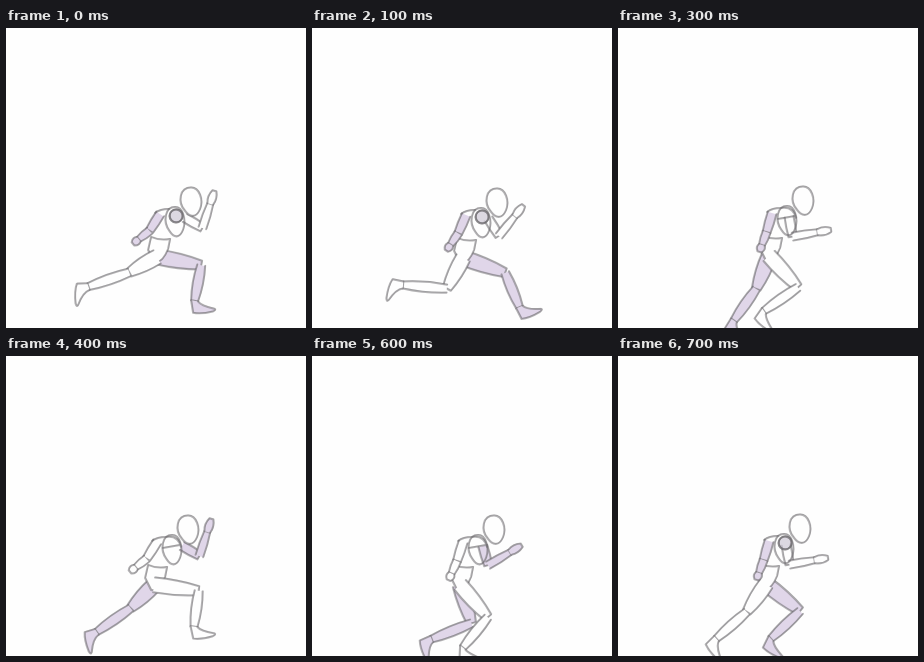
Recreate the animation shown at these times as an HTML page with a canvas. Size 300x300 px, loop 800 ms.

```html
<!DOCTYPE html>
<html lang="en">
<head>
<meta charset="utf-8">
<title>Run cycle</title>
<style>
html, body { margin: 0; height: 100%; overflow: hidden; background: #fefefe; }
canvas { display: block; width: 100vw; height: 100vh; }
</style>
</head>
<body>
<canvas id="stage" width="300" height="300"></canvas>
<script>
const ctx = document.getElementById('stage').getContext('2d');
const PAPER = '#fefefe', LILAC = '#e0d6e9';
const STEP = 100, BEATS = 8, HALF = BEATS / 2;

// Joint angles over one stride, in degrees from straight down, forward positive.
// Both legs share them, half a stride apart.
const THIGH = [81, 69, 45, -28, -53, -20, 10, 47];
const SHIN = [-9, 21, -35, -42, -63, -87, -75, -51];

const rad = deg => deg * Math.PI / 180;
const shift = ([x, y], dx, dy) => [x + dx, y + dy];
const reach = ([x, y], deg, len) => [x + len * Math.sin(rad(deg)), y + len * Math.cos(rad(deg))];
const mix = (a, b, t) => a.map((v, i) => v + (b[i] - v) * t);

// Two loose pencil passes over one path
function pencil(path) {
  ctx.save();
  ctx.strokeStyle = 'rgba(108,106,110,.5)';
  ctx.lineWidth = 1.9;
  ctx.stroke(path);
  ctx.translate(.6, -.5);
  ctx.strokeStyle = 'rgba(108,106,110,.3)';
  ctx.lineWidth = 1.2;
  ctx.stroke(path);
  ctx.restore();
}

function sketch(path, fill) {
  if (fill) {
    ctx.fillStyle = fill;
    ctx.fill(path);
  }
  pencil(path);
}

// Tapered limb, left open at its start; half-widths at start, middle and end
function segment(a, b, wa, wm, wb, fill) {
  const len = Math.hypot(b[0] - a[0], b[1] - a[1]);
  const at = (p, w) => shift(p, (a[1] - b[1]) / len * w, (b[0] - a[0]) / len * w);
  const mid = mix(a, b, .5), path = new Path2D();
  path.moveTo(...at(a, wa));
  path.quadraticCurveTo(...at(mid, wm), ...at(b, wb));
  path.lineTo(...at(b, -wb));
  path.quadraticCurveTo(...at(mid, -wm), ...at(a, -wa));
  sketch(path, fill);
}

function foot(ankle, shin, deg, fill) {
  const heel = reach(ankle, deg - 75, 12), toe = reach(ankle, deg, 21);
  const path = new Path2D();
  path.moveTo(...reach(ankle, shin - 90, 3.5));
  path.lineTo(...heel);
  path.quadraticCurveTo(...reach(heel, deg + 10, 8), ...reach(toe, deg - 90, 3));
  path.quadraticCurveTo(...reach(toe, deg, 3), ...toe);
  path.quadraticCurveTo(...reach(ankle, deg - 15, 8), ...reach(ankle, shin + 90, 3.5));
  sketch(path, fill);
}

// The plain leg trails a little further back than the tinted one
function leg(hip, beat, fill, side) {
  const lag = 8 * side * Math.sin(Math.PI * (beat - .5) / BEATS);
  const thigh = THIGH[beat] + lag, shin = SHIN[beat] + lag;
  const sole = 24 + lag + 60 * Math.cos(2 * Math.PI * (beat - .9) / BEATS);
  const knee = reach(hip, thigh, 38 + 7 * Math.sin(rad(thigh)));
  const ankle = reach(knee, shin, 36 + 8 * Math.sin(rad(shin)) ** 2);
  segment(hip, knee, 7.5, 8.5, 4.5, fill);
  segment(knee, ankle, 4, 6.5, 3.5, fill);
  foot(ankle, shin, sole, fill);
}

function arm(shoulder, upper, lower, length, fill) {
  const elbow = reach(shoulder, upper, 20);
  const tip = reach(elbow, lower, length), wrist = mix(elbow, tip, .65);
  segment(shoulder, elbow, 4.5, 5, 4, fill);
  segment(elbow, wrist, 4, 4.5, 3, fill);
  segment(wrist, tip, 3, 5.5, 2, fill);
}

function egg([x, y], rx, ry, fill) {
  const path = new Path2D();
  path.moveTo(x, y - ry);
  path.bezierCurveTo(x + rx * .8, y - ry, x + rx * 1.2, y - 2, x + rx * .85, y + ry * .5);
  path.bezierCurveTo(x + rx * .5, y + ry * 1.1, x - rx * .1, y + ry * 1.1, x - rx * .6, y + ry * .6);
  path.bezierCurveTo(x - rx * 1.3, y, x - rx * 1.1, y - ry, x, y - ry);
  sketch(path, fill);
}

function pelvis([x, y]) {
  const path = new Path2D();
  path.moveTo(x - 10, y);
  path.lineTo(x - 7, y - 13);
  path.quadraticCurveTo(x + 2, y - 9, x + 12, y - 11);
  path.lineTo(x + 10, y - 1);
  path.quadraticCurveTo(x + 4, y + 14, x - 4, y + 12);
  path.closePath();
  sketch(path, PAPER);
}

function shoulders([x, y], round) {
  const path = new Path2D();
  path.moveTo(x - 20, y - 9);
  path.quadraticCurveTo(x - 15, y - 13, x - 6, y - 13);
  if (!round) {
    path.quadraticCurveTo(x + 6, y - 15, x + 9, y - 3);
    path.moveTo(x - 9, y - 2);
    path.lineTo(x + 8, y - 5);
  }
  pencil(path);
  if (round) {
    const joint = new Path2D();
    joint.arc(x + 1, y - 6, 6.5, 0, 2 * Math.PI);
    sketch(joint, 'rgba(205,200,212,.7)');
    pencil(joint);
  }
}

function draw(beat) {
  const step = beat % HALF, drift = beat < HALF ? 0 : -3;
  const bob = Math.sin(step * Math.PI / 2);
  const place = (x, y) => [x + drift, y + bob];
  const head = place(185, 174), chest = place(169, 194), hip = place(152, 222);
  const swing = 1 - step / (HALF - 1), snap = swing ** 2;
  const tintedFront = beat >= HALF && beat < BEATS - 1;
  const legTop = shift(hip, -1, 7);

  ctx.fillStyle = PAPER;
  ctx.fillRect(0, 0, 300, 300);
  leg(legTop, beat, LILAC, 1);
  pelvis(hip);
  leg(legTop, (beat + HALF) % BEATS, PAPER, -1);
  arm(shift(chest, -15, -8), -16 - 16 * snap, -20 - 32 * snap, 21, tintedFront ? PAPER : LILAC);
  arm(shift(chest, 2 + 8 * swing, -4), 10 + 50 * snap, 100 + 62 * swing, 39, tintedFront ? LILAC : PAPER);
  egg(chest, 9.5, 15);
  shoulders(chest, (beat + 1) % BEATS < HALF);
  egg(head, 10.5, 14.5, PAPER);
}

ctx.lineJoin = ctx.lineCap = 'round';
const start = performance.now();
function tick() {
  draw(Math.floor((performance.now() - start) / STEP) % BEATS);
  requestAnimationFrame(tick);
}
tick();
</script>
</body>
</html>
```
